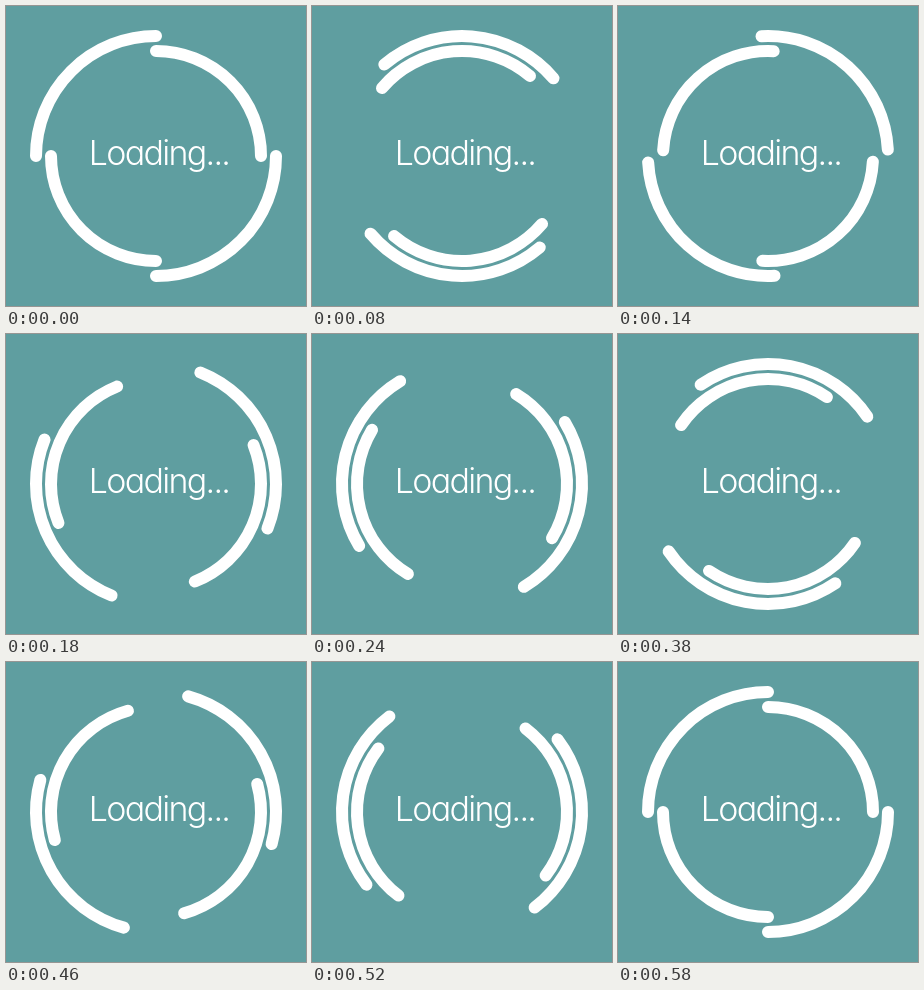
Animation of 300x300 px, one loop 0.6 s. Source, as an HTML page with a canvas:

```html
<!DOCTYPE html>
<html lang="en">
<head>
<meta charset="utf-8">
<title>Loading</title>
<style>
  html, body { margin: 0; width: 100%; height: 100%; overflow: hidden; background: #5f9ea0; }
  canvas, svg { position: absolute; left: 0; top: 0; width: 300px; height: 300px; }
  text {
    font: 300 34px Inter, Lato, sans-serif;
    font-feature-settings: "cv11";
    font-optical-sizing: none;
    letter-spacing: -0.05em;
    text-anchor: middle;
    fill: #fff;
  }
</style>
</head>
<body>
<canvas id="stage" width="300" height="300"></canvas>
<svg viewBox="0 0 300 300"><text x="153" y="159">Loading...</text></svg>
<script>
const ctx = document.getElementById('stage').getContext('2d');
const STEP = 20;
const STEPS = 30;
const QUARTER = Math.PI / 2;

// Two opposite quarter arcs on one circle.
function arcPair(radius, start) {
  for (const from of [start, start + Math.PI]) {
    ctx.beginPath();
    ctx.arc(150, 150, radius, from, from + QUARTER);
    ctx.stroke();
  }
}

function draw(time) {
  const step = Math.floor(time / STEP) % STEPS;
  // The last step closes the full turn, so it equals the first.
  const turn = step / (STEPS - 1) * 2 * Math.PI;
  ctx.fillStyle = '#5f9ea0';
  ctx.fillRect(0, 0, 300, 300);
  ctx.strokeStyle = '#fff';
  ctx.lineWidth = 12;
  ctx.lineCap = 'round';
  arcPair(120, turn);
  arcPair(105, QUARTER - turn);
}

let origin;
function tick(now) {
  origin ??= now;
  draw(now - origin);
  requestAnimationFrame(tick);
}
draw(0);
requestAnimationFrame(tick);
</script>
</body>
</html>
```
